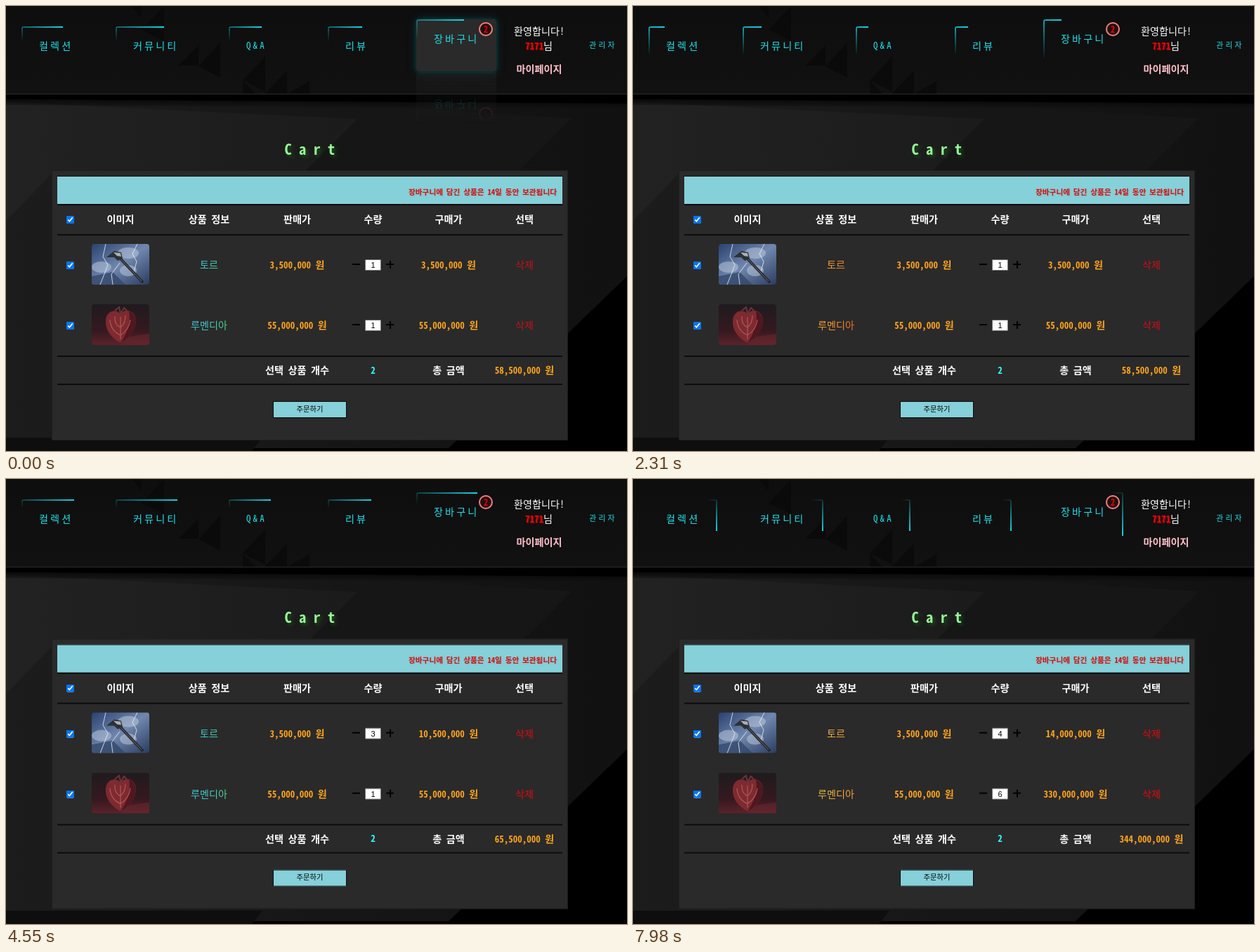
An HTML page that plays this animation: 884x634 px, repeating every 8000 ms.

```html
<!DOCTYPE html>
<html lang="ko">
<head>
<meta charset="utf-8">
<style>
html, body { margin: 0; width: 100%; height: 100%; overflow: hidden; background: #000; }
body { font: 13px/1 'Noto Sans Mono CJK KR', 'Noto Sans CJK KR', 'Noto Sans CJK', monospace; color: #fff; }
#stage { position: relative; width: 884px; height: 634px; overflow: hidden; }
#stage * { position: absolute; box-sizing: border-box; }
svg { left: 0; top: 0; overflow: visible; }
.t { white-space: pre; transform: translate(-50%, -50%); }
#stage .t * { position: static; }
.ko { font-size: 14.13px; word-spacing: -.5px; }
.b { font-weight: 700; }
.price { color: #ffa41c; font-weight: 700; }
.nav { overflow: hidden; border-radius: 4px; color: #22dfe8; letter-spacing: 3.1px; }
.nav b { font-weight: 400; left: 25px; white-space: pre; }
.nav i { width: 100%; height: 100%; }
.nav i:nth-child(1) { top: 0; height: 2px; background: linear-gradient(90deg, transparent, #13d5e2); }
.nav i:nth-child(2) { right: 0; width: 2px; background: linear-gradient(180deg, transparent, #13d5e2); }
.nav i:nth-child(3) { bottom: 0; height: 2px; background: linear-gradient(270deg, transparent, #13d5e2); }
.nav i:nth-child(4) { left: 0; width: 2px; background: linear-gradient(0deg, transparent, #13d5e2); }
#badge { left: 89px; top: 4px; width: 20px; height: 20px; border: 2px solid #f08080; border-radius: 50%;
  background: #240e0e; color: #e00000; font-weight: 700; line-height: 16px; letter-spacing: 0; text-align: center; }
.rule { left: 73px; width: 719px; height: 2px; background: #0c0c0c; }
input { left: 86px; width: 11px; height: 11px; margin: 0; pointer-events: none; }
.qty { left: 511px; width: 23px; height: 16px; background: #fff; border: 1px solid #777; border-radius: 1px;
  color: #000; font: 11px/14px 'Liberation Sans', sans-serif; text-align: center; }
.pic { left: 122px; width: 82px; height: 58px; border-radius: 4px; overflow: hidden; }
.name { color: transparent; background-clip: text; -webkit-background-clip: text; padding: 2px 0; }
</style>
</head>
<body>
<div id="stage">
  <svg width="884" height="634">
    <defs>
      <linearGradient id="wall" x2="1"><stop stop-color="#1c1c1c"/><stop offset="1" stop-color="#111"/></linearGradient>
      <linearGradient id="facet" x2="1"><stop stop-color="#222"/><stop offset="1" stop-color="#1b1b1b"/></linearGradient>
      <linearGradient id="head" x2="0" y2="1"><stop stop-color="#0e0e0e"/><stop offset="1" stop-color="#111"/></linearGradient>
      <linearGradient id="fall" x2="0" y2="1"><stop stop-opacity=".6"/><stop offset="1" stop-opacity="0"/></linearGradient>
    </defs>
    <path fill="url(#wall)" d="M0 126H884V385L630 630H0Z"/>
    <path fill="#161616" d="M480 140L805 160L730 235H400Z"/>
    <path fill="url(#facet)" d="M0 137L500 161L425 236H68L0 306Z"/>
    <path d="M0 615H365L350 634H0Z" fill="#0e0e0e"/>
    <path d="M0 126H884V139L0 133Z"/>
    <path fill="url(#fall)" d="M0 133L884 139V147L0 141Z"/>
    <path fill="url(#head)" d="M0 0H884V125H0Z"/>
    <path fill="#080808" opacity=".6" d="M179 0H193V17ZM193 34L225 0V50ZM245 85L274 56V85ZM274 86L305 52V102ZM337 106L369 72V122ZM337 106V125H355ZM368 125L400 92V125ZM400 125L432 107V125Z"/>
    <path stroke="#2b2b2b" d="M0 125.5H884"/>
  </svg>
  <div id="page" style="left:0;top:0;width:884px;height:634px">
    <div style="left:65px;top:234px;width:735px;height:385px;background:#2a2a2a;border:1px solid #1d1d1d"></div>
    <div style="left:73px;top:242px;width:719px;height:41px;background:#86d0d9;border-top:1px solid #0c0c0c"></div>
  </div>
  <div id="status" style="left:0;top:626px;width:231px;height:10px;background:#1c1822;border:1px solid #302b38;border-radius:0 4px 0 0"></div>
</div>
<script>
const stage = document.getElementById('stage'), page = document.getElementById('page');
const statusBar = document.getElementById('status');

function add(parent, cls, css, html = '') {
  const el = document.createElement('div');
  el.className = cls;
  el.style.cssText = css;
  el.innerHTML = html;
  parent.append(el);
  return el;
}
const text = (parent, x, y, html, cls = '', css = '') =>
  add(parent, 't ' + cls, `left:${x}px;top:${y - .6}px;${css}`, html);

// Header
const navs = [[22, 29, 98, '컬렉션'], [156, 29, 115, '커뮤니티'], [317, 29, 78, 'Q&amp;A'], [458, 29, 81, '리뷰'], [584, 19, 114, '장바구니']];
const items = navs.map(([x, y, w, label], i) => add(stage, 'nav',
  `left:${x}px;top:${y}px;width:${w}px;height:${i == 4 ? 74 : 54}px`,
  `<i></i><i></i><i></i><i></i><b class="${i == 2 ? '' : 'ko'}" style="top:19.5px">${label}</b>`));
const cart = items[4];
add(cart, '', '', '2').id = 'badge';
text(stage, 759, 36, '환영합니다!', 'ko');
text(stage, 758.5, 57, '<span class="b" style="color:#e00808;text-shadow:1px 1px 1px #a00">7171</span><span class="ko">님</span>');
text(stage, 759, 90, '마이페이지', 'ko b', 'color:#ffc0cb');
text(stage, 850, 55.5, '관리자', '', 'font-size:10.8px;letter-spacing:3.2px;color:#22dfe8');

// Cart table
const cols = [163, 289, 414.5, 522.5, 630, 738];
text(page, 437.5, 204, 'Cart', 'b', 'font-size:20.5px;letter-spacing:10.2px;color:#98fb98;text-shadow:3px 3px 5px #1a4d1a');
text(page, 678.5, 266, '장바구니에 담긴 상품은 14일 동안 보관됩니다', 'b',
  'font-size:10.65px;word-spacing:-.5px;color:#d80c0c;text-shadow:1px 1px 2px #8885');
['이미지', '상품 정보', '판매가', '수량', '구매가', '선택'].forEach((s, i) => text(page, cols[i], 304, s, 'ko b'));
[282, 324.5, 497.5, 537.5].forEach(y => add(page, 'rule', `top:${y}px`));
const check = y => add(page, '', `left:0;top:${y - 5.5}px`, '<input type="checkbox" checked tabindex="-1">');
check(304);

const storm = `<svg width="82" height="58"><defs><linearGradient id="sky" x2="1" y2="1">
  <stop stop-color="#29426f"/><stop offset=".5" stop-color="#7187ad"/><stop offset="1" stop-color="#2a3c60"/></linearGradient></defs>
  <path fill="url(#sky)" d="M0 0H82V58H0Z"/>
  <g fill="#c2cfe2" opacity=".5"><ellipse cx="14" cy="33" rx="14" ry="8"/><ellipse cx="52" cy="13" rx="15" ry="8"/><ellipse cx="52" cy="38" rx="12" ry="8"/></g>
  <path d="M0 46L30 40L48 58H0Z" fill="#34486c" opacity=".8"/>
  <path d="M65 0L58 14L64 25L60 40M20 0L16 18L23 30L12 58M40 27L28 43L30 58" fill="none" stroke="#eef4ff" stroke-width=".8"/>
  <path d="M38 18L73 55" stroke="#25272d" stroke-width="4"/><path d="M39 19L71 53" stroke="#77736d"/>
  <path d="M21 19L32 10L42 12L44 21L37 24L32 19Z" fill="#2d3136"/><path d="M31 12L41 13L42 18L36 17Z" fill="#a9b0b4"/></svg>`;
const heart = `<svg width="82" height="58"><defs><linearGradient id="dusk" x2="0" y2="1">
  <stop stop-color="#1f1b1e"/><stop offset=".65" stop-color="#35191f"/><stop offset="1" stop-color="#5c222a"/></linearGradient></defs>
  <path fill="url(#dusk)" d="M0 0H82V58H0Z"/><path fill="#6d2831" opacity=".5" d="M42 48L82 42V58H42Z"/>
  <path d="M41 55C28 48 19 37 20 23C21 8 36 6 41 14C47 5 62 8 63 23C63 37 53 48 41 55Z" fill="#7d2a30"/>
  <path d="M41 55C53 48 63 37 63 23C61 15 58 11 53 10C56 26 50 42 41 55Z" fill="#4f171f"/>
  <path d="M41 50V18M41 44Q27 38 26 22M41 44Q53 37 55 22M41 33Q32 29 33 17M41 33Q48 27 48 16" fill="none" stroke="#ad5453" stroke-width="1.3"/>
  <path d="M33 9L39 4L41 13L46 5L50 9" fill="none" stroke="#6a333a" stroke-width="2"/></svg>`;

const won = n => n.toLocaleString('en-US') + ' <span class="ko">원</span>';
const rows = [
  { y: 369, name: '토르', cost: 3500000, pic: storm, spread: .07, clicks: [3640, 4130, 4900] },
  { y: 455, name: '루멘디아', cost: 55000000, pic: heart, spread: .15, clicks: [5390, 5740, 6090, 6370, 7210] }
];
for (const r of rows) {
  const y = r.y;
  check(y);
  r.img = add(page, 'pic', `top:${y - 30}px`, r.pic);
  r.label = text(page, cols[1], y, r.name, 'ko name');
  text(page, cols[2], y, won(r.cost), 'price');
  add(page, '', `left:493px;top:${y - 2}px;width:11px;height:2px;background:#000`);
  add(page, '', `left:541px;top:${y - 2}px;width:11px;height:2px;background:#000`);
  add(page, '', `left:545.5px;top:${y - 6.5}px;width:2px;height:11px;background:#000`);
  r.qty = add(page, 'qty', `top:${y - 8}px`);
  r.sum = text(page, cols[4], y, '', 'price');
  r.del = text(page, cols[5], y, '삭제', 'ko', 'color:#c4121a');
}
text(page, cols[2], 519, '선택 상품 개수', 'ko b');
text(page, cols[3], 519, '2', 'b', 'color:#3ff');
text(page, cols[4], 519, '총 금액', 'ko b');
const total = text(page, cols[5], 519, '', 'price');
add(page, '', 'left:380px;top:563px;width:105px;height:24px;background:#86d0d9;border:1px solid #0c0c0c');
text(page, 432.5, 574.5, '주문하기', '', 'font-size:10.3px;color:#000');

// Motion
const LOOP = 8000, TICK = 70, SPIN = 1050, FADE = 5250, RELOAD = 1400, READY = 1820;
const pauses = [[140, 280], [1190, 1400], [1470, 1610], [1680, 1820]];
const clamp = (v, a = 0, b = 1) => Math.min(b, Math.max(a, v));
const wave = p => (1 - Math.cos(p * 2 * Math.PI)) / 2;
const slide = p => clamp((p - Math.floor(p)) * 2) * 200 - 100 + '%';

const stops = [[0, 240, 104, 36], [.17, 245, 146, 46], [.4, 245, 172, 58], [.55, 214, 186, 70], [.72, 95, 205, 112], [.88, 70, 205, 160], [1, 62, 200, 205]];
function tint(u) {
  u = clamp(u);
  const i = Math.max(1, stops.findIndex(s => s[0] >= u)), a = stops[i - 1], b = stops[i];
  const k = (u - a[0]) / (b[0] - a[0]);
  return `rgb(${[1, 2, 3].map(c => a[c] + (b[c] - a[c]) * k)})`;
}

function linePhases(t) {
  if (t >= RELOAD && t < READY) return [.163 + (t - 1610) / SPIN, .6, .25, .6];
  const p = t / SPIN + (t < RELOAD ? .15 : .858);
  return [p, p - .25, p - .5, p - .75];
}

function draw(time) {
  let t = Math.floor(time / TICK) * TICK;
  for (const [a, b] of pauses) if (t > a && t < b) t = a;

  const [top, right, bottom, left] = linePhases(t).map(slide);
  for (const el of items) {
    const s = el.children;
    s[0].style.left = top;
    s[1].style.top = right;
    s[2].style.right = bottom;
    s[3].style.bottom = left;
  }

  const hover = clamp((1000 - t) / 500);
  cart.style.background = `rgba(42,42,42,${hover})`;
  cart.style.boxShadow = `0 0 5px rgba(3,90,96,${hover * .5}), 0 0 12px rgba(3,90,96,${hover * .55})`;
  cart.style.webkitBoxReflect = hover ? `below 1px linear-gradient(transparent, rgba(0,0,0,${hover / 3}))` : 'none';

  page.style.transform = `translateY(${-6.4 * clamp((t - 2660) / 140)}px)`;
  statusBar.style.visibility = t >= 1120 && t < READY ? 'visible' : 'hidden';

  const cycle = t < RELOAD ? t + 2940 : Math.max(0, t - 1610);
  const u = wave(cycle / FADE);
  let all = 0;
  for (const r of rows) {
    const n = 1 + r.clicks.filter(c => t >= c).length;
    all += n * r.cost;
    r.qty.textContent = n;
    r.sum.innerHTML = won(n * r.cost);
    r.label.style.backgroundImage = `linear-gradient(90deg, ${tint(u + r.spread)}, ${tint(u)}, ${tint(u - r.spread)})`;
    r.del.style.textShadow = `1px 1px 4px rgba(220,0,0,${wave(t / 2100)})`;
  }
  total.innerHTML = won(all);
  rows[1].img.style.height = (t >= RELOAD && t < READY ? 9 : 58) + 'px';
}

const start = performance.now();
(function frame() {
  draw((performance.now() - start) % LOOP);
  requestAnimationFrame(frame);
})();
</script>
</body>
</html>
```
